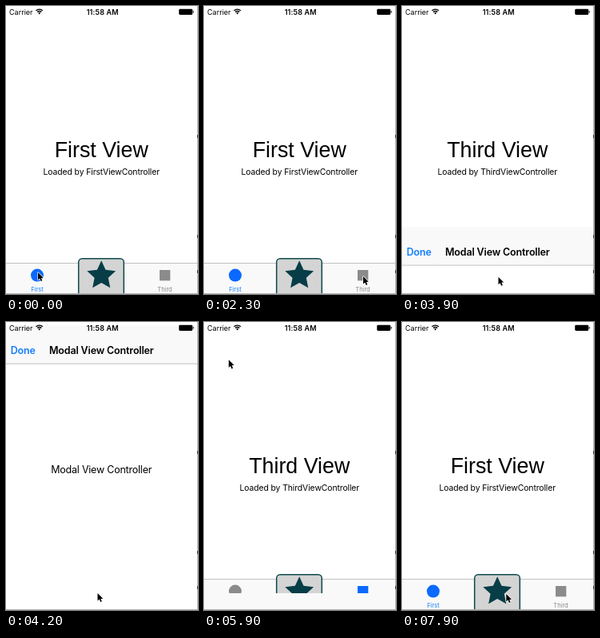
An HTML page with a canvas that plays this animation: 240 px wide and 360 px high, repeating every 8000 ms.

```html
<!DOCTYPE html>
<html lang="en">
<head>
<meta charset="utf-8">
<title>Tab bar with modal view</title>
<style>
html, body { margin: 0; width: 100%; height: 100%; overflow: hidden; background: #fff; }
canvas { display: block; width: 240px; height: 360px; }
</style>
</head>
<body>
<canvas id="stage"></canvas>
<script>
const W = 240, H = 360, LOOP = 8000, STEP = 100;
const BLUE = '#0b69ff', LINK = '#147efb', GRAY = '#8b8b8b', TEAL = '#063d47', BAR = '#f9f9f9';
const UI = 'Inter, "Open Sans", sans-serif';
const HEADING = '"Liberation Sans", Arial, sans-serif';

const canvas = document.getElementById('stage');
const ctx = canvas.getContext('2d');
const dpr = window.devicePixelRatio || 1;
canvas.width = W * dpr;
canvas.height = H * dpr;

// Pointer rests: time, x, y. It eases from one to the next.
const pointer = [
  [0, 40, 333], [1100, 40, 333], [2270, 199, 338], [2500, 199, 338],
  [3100, 131.5, 338], [3600, 131.5, 338], [4100, 114.5, 339], [4500, 114.5, 339],
  [5300, 30.3, 37], [5800, 30.3, 37], [6700, 47.3, 339], [7100, 47.3, 339],
  [7850, 130.3, 340], [LOOP, 130.3, 340]
];
const TO_THIRD = 2400, TO_FIRST = 7000, OPEN = 3850, CLOSE = 5650;

function rect(x, y, w, h, color) {
  ctx.fillStyle = color;
  ctx.fillRect(x, y, w, h);
}

function disc(x, y, r, color) {
  ctx.fillStyle = color;
  ctx.beginPath();
  ctx.arc(x, y, r, 0, Math.PI * 2);
  ctx.fill();
}

function polygon(points, color) {
  ctx.fillStyle = color;
  ctx.beginPath();
  for (const [x, y] of points) ctx.lineTo(x, y);
  ctx.closePath();
  ctx.fill();
}

function text(str, x, y, size, { color = '#000', weight = 400, family = UI, align = 'center', spacing = 0 } = {}) {
  ctx.font = `${weight} ${size}px ${family}`;
  ctx.letterSpacing = spacing + 'px';
  ctx.textAlign = align;
  ctx.fillStyle = color;
  ctx.fillText(str, x, y);
}

// Share of the way still to go for a critically damped spring.
function spring(ms) {
  const k = 18.26 * Math.max(0, ms) / 1000;
  return (1 + k) * Math.exp(-k);
}

function pointerAt(t) {
  const i = pointer.findIndex((p, n) => n > 0 && t <= p[0]);
  const [t0, x0, y0] = pointer[i - 1], [t1, x1, y1] = pointer[i];
  const u = (t - t0) / (t1 - t0), s = u * u * (3 - 2 * u);
  return [x0 + (x1 - x0) * s, y0 + (y1 - y0) * s];
}

function modalOffset(t) {
  if (t < OPEN) return H;
  if (t < CLOSE) return H * spring(t - OPEN);
  return H * (1 - spring(t - CLOSE));
}

function drawStar(cx, cy, r) {
  const points = [];
  for (let i = 0; i < 10; i++) {
    const a = i * Math.PI / 5 - Math.PI / 2;
    const d = i % 2 ? r * 0.48 : r;
    points.push([cx + d * Math.cos(a), cy + d * Math.sin(a)]);
  }
  polygon(points, TEAL);
}

function drawTabs(third) {
  const name = third ? 'Third' : 'First';
  rect(0, 0, W, H, '#fff');
  text(name + ' View', 119.2, 188.8, 26.8, { family: HEADING });
  text(`Loaded by ${name}ViewController`, 119.3, 211.3, 10.4, { spacing: -0.1 });

  rect(0, 321, W, 39, BAR);
  rect(0, 321, W, 1, '#c2c2c2');
  disc(39, 336.6, 8, third ? GRAY : BLUE);
  rect(192, 330, 13.3, 13.3, third ? BLUE : GRAY);
  text('First', 39, 356.6, 7.5, { color: third ? GRAY : LINK });
  text('Third', 198.5, 356.6, 7.5, { color: third ? LINK : GRAY });

  ctx.beginPath();
  ctx.roundRect(90.7, 315.7, 56.6, 50, 4.5);
  ctx.fillStyle = '#d4d4d4';
  ctx.fill();
  ctx.strokeStyle = '#0d4a4c';
  ctx.lineWidth = 1.5;
  ctx.stroke();
  drawStar(119.2, 337, 18.8);
}

function drawModal(offset) {
  if (offset >= H) return;
  ctx.save();
  ctx.translate(0, offset);
  rect(0, 0, W, H, '#fff');
  rect(0, 0, W, 47.5, BAR);
  rect(0, 47.3, W, 0.8, '#b4b4b4');
  text('Done', 5.7, 35.5, 12.5, { color: LINK, weight: 600, align: 'left', spacing: -0.2 });
  text('Modal View Controller', 119.3, 35.5, 12.5, { weight: 600, spacing: -0.15 });
  text('Modal View Controller', 119.2, 184.2, 12.5, { spacing: -0.22 });
  ctx.restore();
}

function drawStatus() {
  text('Carrier', 4, 10.5, 9, { align: 'left' });
  text('11:58 AM', 120.7, 10.7, 9, { weight: 600, spacing: 0.15 });

  ctx.strokeStyle = '#000';
  ctx.lineWidth = 1.3;
  for (const r of [3.7, 6.1]) {
    ctx.beginPath();
    ctx.arc(41.7, 10.2, r, -Math.PI * 0.75, -Math.PI * 0.25);
    ctx.stroke();
  }
  polygon([[41.7, 10.4], [40.2, 8.7], [41.7, 8], [43.2, 8.7]], '#000');

  ctx.fillStyle = '#000';
  ctx.beginPath();
  ctx.roundRect(216.2, 3.7, 17, 7.2, 1.4);
  ctx.fill();
  rect(233.7, 6.1, 1, 2.4, '#000');
}

function drawEdges() {
  rect(239, 0, 1, H, '#b3b3b3');
  rect(0, 359, W, 1, '#b3b3b3');
  for (const y of [161, 286, 330]) rect(239, y, 1, 4, '#333');
}

function drawPointer(x, y) {
  ctx.save();
  ctx.translate(x, y);
  ctx.scale(0.9, 0.9);
  ctx.beginPath();
  const shape = [[0, 0], [0, 10.6], [2.4, 8.4], [4.1, 12.3], [5.9, 11.5], [4.3, 7.7], [7.5, 7.5]];
  for (const [px, py] of shape) ctx.lineTo(px, py);
  ctx.closePath();
  ctx.lineJoin = 'round';
  ctx.lineWidth = 1.4;
  ctx.strokeStyle = '#fff';
  ctx.stroke();
  ctx.fillStyle = '#000';
  ctx.fill();
  ctx.restore();
}

function draw(t) {
  ctx.setTransform(dpr, 0, 0, dpr, 0, 0);
  drawTabs(t >= TO_THIRD && t < TO_FIRST);
  drawModal(modalOffset(t));
  drawStatus();
  drawEdges();
  drawPointer(...pointerAt(t));
}

const start = performance.now();
function tick() {
  const t = (performance.now() - start) % LOOP;
  draw(Math.floor(t / STEP) * STEP);
  requestAnimationFrame(tick);
}
tick();
</script>
</body>
</html>
```
